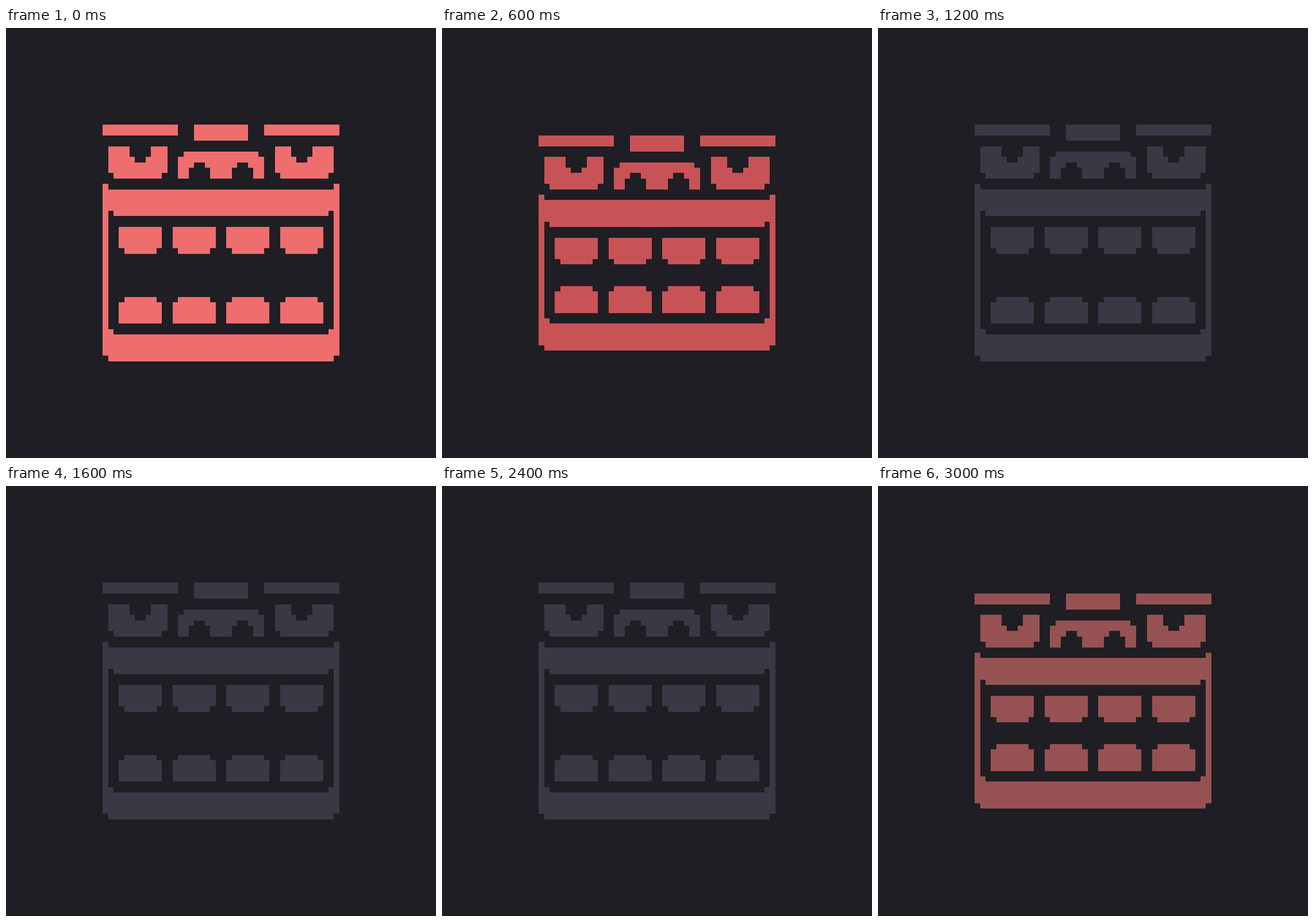
An HTML page with a canvas that plays this animation: 748x748 px, repeating every 3100 ms.

```html
<!DOCTYPE html>
<html lang="en">
<head>
<meta charset="utf-8">
<title>Chomping face</title>
<style>
  html, body { margin: 0; width: 100%; height: 100%; overflow: hidden; background: #1f1e24; }
  canvas { display: block; }
</style>
</head>
<body>
<canvas id="stage" width="748" height="748"></canvas>
<script>
const ctx = document.getElementById('stage').getContext('2d');
const CELL = 748 / 80, STEP = 100, STEPS = 31;
const BG = '#1f1e24', GRAY = '#3b3744', RED = '#f35a58';

// Jaw opening in cells: a bite first, then slow breathing
const BITE = [0, 7, 11.5, 4, -6, -5];
const BREATH = [0, 1, 2, 1, 0, -1, -2, -1];
const TINT = { 0: '#ee6e6e', 1: '#f26462', 2: RED, 3: RED, 4: RED, 5: RED,
               6: '#c85356', 7: '#77484e', 30: '#965252' };

const px = n => Math.round(n * CELL);

// Fill the cell area from (x1, y1) to (x2, y2)
function box(x1, y1, x2, y2) {
  ctx.fillRect(px(x1), px(y1), px(x2) - px(x1), px(y2) - px(y1));
}

// The same area on both sides of the vertical axis
function pair(x1, y1, x2, y2) {
  box(x1, y1, x2, y2);
  box(80 - x2, y1, 80 - x1, y2);
}

function upperFace(y, color) {
  ctx.fillStyle = color;
  pair(18, y + 18, 32, y + 20);
  box(35, y + 18, 45, y + 21);
  pair(19, y + 22, 30, y + 27);
  pair(20, y + 27, 29, y + 28);
  box(33, y + 23, 47, y + 24);
  box(32, y + 24, 48, y + 28);
  box(18, y + 30, 62, y + 34);
  box(20, y + 34, 60, y + 35);

  // Pupils and nostrils
  ctx.fillStyle = BG;
  pair(23, y + 22, 27, y + 24);
  pair(24, y + 24, 26, y + 25);
  pair(35, y + 25, 37, y + 26);
  pair(34, y + 26, 38, y + 28);
}

function lowerJaw(y) {
  pair(18, y + 56, 20, y + 57);
  box(18, y + 57, 62, y + 61);
  box(19, y + 61, 61, y + 62);
}

function teeth(up, down) {
  for (let x = 21; x < 60; x += 10) {
    box(x, up + 37, x + 8, up + 41);
    box(x + 1, up + 41, x + 7, up + 42);
    box(x + 1, down + 50, x + 7, down + 51);
    box(x, down + 51, x + 8, down + 55);
  }
}

function draw(k) {
  const open = k < BITE.length ? BITE[k] : BREATH[k % BREATH.length];
  const up = Math.floor(-open), down = Math.floor(open);
  const color = TINT[k] || GRAY;
  ctx.fillStyle = BG;
  ctx.fillRect(0, 0, 748, 748);
  upperFace(up, color);
  ctx.fillStyle = color;
  pair(18, up + 29, 19, down + 61);
  lowerJaw(down);
  teeth(up, down);
}

const start = performance.now();
function tick() {
  draw(Math.floor((performance.now() - start) / STEP) % STEPS);
  requestAnimationFrame(tick);
}
tick();
</script>
</body>
</html>
```
